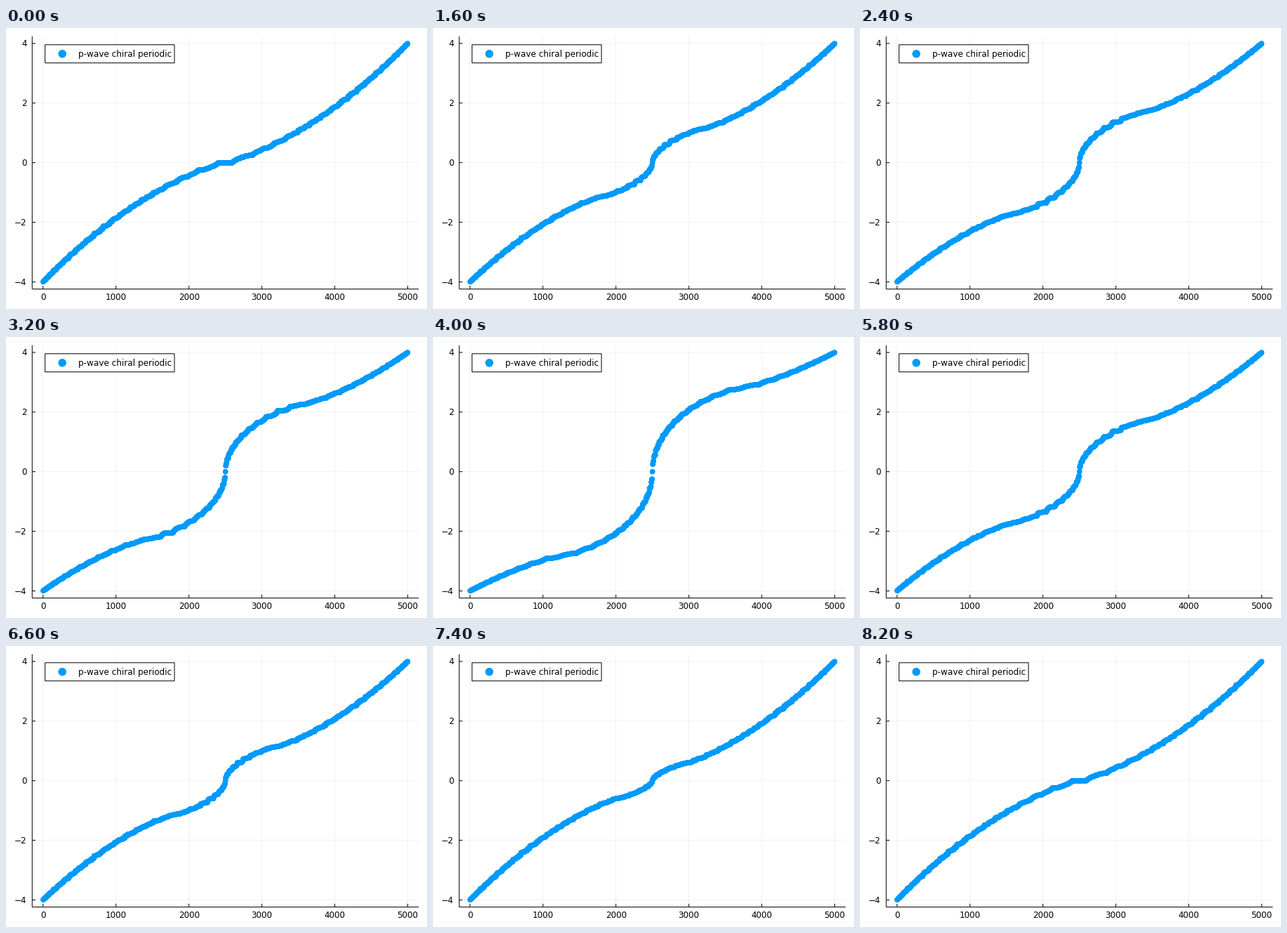
A matplotlib script that plays this animation: 600x400 px, repeating every 8.4 s.

```python
import numpy as np
import matplotlib.pyplot as plt
from matplotlib.animation import FuncAnimation
from matplotlib.patches import Rectangle

W, H, DPI = 600, 400, 100
PT = 72 / DPI                     # points per pixel
LEFT, RIGHT, TOP, BOTTOM = 37.3, 588.19, 11.81, 371.61
BLUE = "#009AFA"
N = 50                            # lattice sites per side
STEPS = 21                        # pairing strengths 0, 0.1, ... 2
COUNT = 2 * N * N

plt.rcParams["font.family"] = "DejaVu Sans"
fig = plt.figure(figsize=(W / DPI, H / DPI), dpi=DPI, facecolor="white")
ax = fig.add_axes([0, 0, 1, 1])
ax.set_xlim(0, W)
ax.set_ylim(H, 0)
ax.axis("off")

# Data limits with a 3 % margin on each side
pad_x, pad_y = 0.03 * (COUNT - 1), 0.03 * 8
X0, X1 = 1 - pad_x, COUNT + pad_x
Y0, Y1 = -4 - pad_y, 4 + pad_y


def px(x):
    return LEFT + (x - X0) / (X1 - X0) * (RIGHT - LEFT)


def py(y):
    return BOTTOM - (y - Y0) / (Y1 - Y0) * (BOTTOM - TOP)


def line(xs, ys, width=1.0, alpha=1.0):
    ax.plot(xs, ys, color="black", lw=width * PT, alpha=alpha, snap=False,
            solid_capstyle="butt", zorder=1)


def label(x, y, text, ha):
    ax.text(x, y + 4.4, text, ha=ha, va="baseline", fontsize=12 * PT, zorder=6)


def dots(x, y, radius, zorder):
    return ax.scatter(x, y, s=(2 * radius * PT) ** 2, c=BLUE, linewidths=0,
                      edgecolors="none", zorder=zorder)


def spectrum(delta):
    """Sorted energies of the periodic chiral p-wave lattice."""
    k = 2 * np.pi * np.arange(N) / N
    kx, ky = np.meshgrid(k, k)
    xi = 2 * (np.cos(kx) + np.cos(ky))
    gap = delta * np.hypot(np.sin(kx), np.sin(ky))
    e = np.hypot(xi, gap).ravel()
    return np.sort(np.concatenate([-e, e]))


# Grid, ticks and axes
TICK = 4.72
for v in range(0, 5001, 1000):
    x = px(v)
    line([x, x], [TOP, BOTTOM], 0.5, 0.1)
    line([x, x], [BOTTOM, BOTTOM - TICK])
    label(x, 383, str(v), "center")
for v in range(-4, 5, 2):
    y = py(v)
    line([LEFT, RIGHT], [y, y], 0.5, 0.1)
    line([LEFT, LEFT + TICK], [y, y])
    label(29.5, y, str(v).replace("-", "\u2212"), "right")
line([LEFT, RIGHT], [BOTTOM, BOTTOM])
line([LEFT, LEFT], [TOP, BOTTOM])

# Legend
ax.add_patch(Rectangle((55.66, 23.8), 184.4, 25.92, facecolor="white",
                       edgecolor="black", lw=PT, snap=False, zorder=4))
dots([80.2], [36.76], 5.76, 5)
label(102.8, 36.76, "p-wave chiral periodic", "left")

index_px = px(np.arange(1, COUNT + 1))
levels = dots(index_px, py(spectrum(0)), 3.6, 3)


def update(frame):
    step = min(frame, 2 * STEPS - 1 - frame)    # up, then back down
    levels.set_offsets(np.column_stack([index_px, py(spectrum(0.1 * step))]))
    return (levels,)


anim = FuncAnimation(fig, update, frames=2 * STEPS, interval=200,
                     repeat=True, repeat_delay=0)
plt.show()
```
